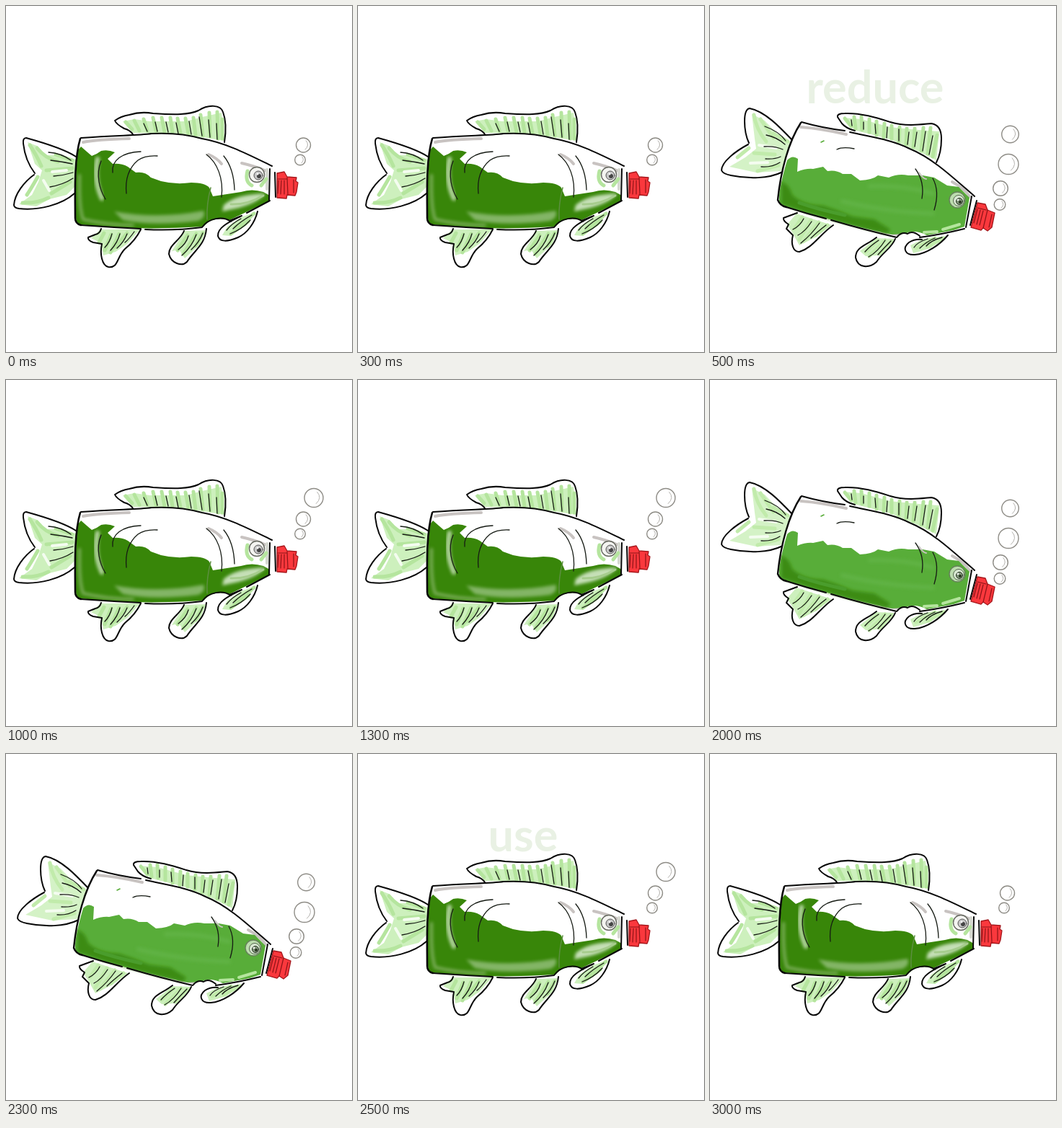
An HTML page that plays this animation: 480 by 480 pixels, repeating every 3500 ms.

```html
<!DOCTYPE html>
<html lang="en">
<head>
<meta charset="utf-8">
<title>Bottle fish</title>
<style>
html, body { margin: 0; width: 100%; height: 100%; overflow: hidden; background: #fff; }
svg { display: block; width: 100%; height: 100%; }
path, circle { fill: none; stroke-linecap: round; stroke-linejoin: round; }
.ink { stroke: #080808; stroke-width: 2; }
.thin { stroke: #161b14; stroke-width: 1.3; }
.tint { fill: #cdf0bd; }
.wash { stroke: #b5e59e; stroke-width: 5; }
.gap { stroke: #f4fcf0; stroke-width: 4; }
.grey { stroke: #c8c3c1; stroke-width: 4; }
.dark { fill: #388609; }
.leaf { fill: #58ad39; }
.glow { stroke: #a6cc8d; stroke-width: 6; }
.lens { fill: #9cc585; }
.red { fill: #fa383d; stroke: #a5161b; stroke-width: 1.3; }
.rib { stroke: #8d1418; stroke-width: 1.2; }
.soft { filter: url(#soft); }
.bubble { fill: #fff; stroke: #8e8c86; stroke-width: 1.4; }
.shine { stroke: #b4b2ae; stroke-width: 1; }
text { font: 700 63px Lato, sans-serif; fill: #e9f1e4; text-anchor: middle; }
</style>
</head>
<body>
<svg viewBox="0 0 480 480">
<defs><filter id="soft" x="-30%" y="-60%" width="160%" height="220%"><feGaussianBlur stdDeviation="2"/></filter></defs>
<text id="word" x="229" y="135"></text>

<g id="level">
  <!-- tail -->
  <path class="tint" d="M30 189L43 194L56 207L74 207L97 213L97 249L84 262L60 268L42 278L18 275L36 262L45 244L50 228L40 219Z"/>
  <path class="wash" d="M33 193Q42 206 49 222M43 197Q54 211 72 216M44 237Q35 253 29 262M23 273Q43 274 59 266M63 260L89 244M69 206L92 214M56 228L92 225"/>
  <path class="gap" d="M52 242L60 256M64 230L84 228"/>
  <path class="ink" d="M97 209C82 199 57 191 28 183Q23 183 24 191C26 209 33 223 40 232M39 234C25 244 12 261 11 276Q11 280 18 281C45 284 77 276 95 260"/>
  <path class="thin" d="M59 203Q76 204 90 214M62 214Q78 216 92 219M66 236Q80 235 93 231M61 251Q79 248 93 239"/>
  <!-- dorsal fin -->
  <path class="tint" d="M162 160L178 157L200 160L250 160L272 154L299 148L303 187L272 182L230 177L176 176Z"/>
  <path class="wash" d="M166 161l9 10M178 159l7 14M191 157l5 16M204 155l4 18M216 155l4 20M228 155l3 20M238 156l4 20M249 156l4 21M260 155l3 24M270 151l3 29M282 148l1 33M293 147l1 37M300 157l0 27"/>
  <path class="ink" d="M176 178Q172 172 164 170Q153 164 151 159Q159 153 171 151Q187 146 204 149C235 151 254 151 267 145C281 136 298 137 301 147C306 160 305 176 303 189"/>
  <path class="thin" d="M191 163l5 11M207 161l3 13M222 161l3 14M236 162l3 15M254 160l3 18M268 154l4 26M281 158l2 24M292 163l1 22"/>
  <!-- lower fins -->
  <path class="tint" d="M131 310L186 310L168 330L152 341L135 346L132 329L118 322ZM248 312L277 311L270 330L248 350L240 338L230 340ZM347 286L334 304L311 319L300 318L307 306L326 293Z"/>
  <path class="wash" d="M136 315l-7 13M146 317l-9 22M157 316l-12 26M168 315l-17 20M252 318l-14 21M264 316l-18 28M273 315l-10 18M344 288l-26 19M336 299l-24 17"/>
  <path class="ink" d="M132 309Q130 316 124 317L114 321Q113 325 121 328L133 330C130 344 133 360 142 362C156 364 153 349 165 337C175 329 182 320 187 310M247 312C242 325 226 331 226 344C229 357 244 362 251 355C261 339 276 332 278 309M349 285C345 301 335 315 322 321C308 327 296 328 294 319C293 307 311 299 325 292"/>
  <path class="thin" d="M147 316Q144 328 137 335M158 316Q155 328 145 339M168 316Q164 327 154 336M178 313Q171 323 165 328M253 319Q250 330 239 338M264 317Q258 334 244 346M273 315Q268 328 257 338M341 290Q325 299 315 309M339 297Q327 310 311 316M326 295Q313 302 306 311"/>
  <!-- bottle -->
  <path style="fill:#fff" d="M104 183C170 177 230 174 272 184C310 191 345 208 367 223L366 268L312 298Q291 290 272 307Q180 312 97 302Q94 230 104 183"/>
  <path class="grey" d="M107 189Q126 185 171 184M327 218Q345 222 361 229M281 206Q293 211 299 219"/>
  <path class="grey" d="M362 227L362 254" style="stroke:#d5d8d0"/>
  <path class="dark" d="M100 200L104 195L112 202L119 208Q127 205 132 201Q142 199 151 203L141 212L148 219Q160 218 169 223L180 231Q193 229 201 238L215 243Q235 248 257 245Q276 245 282 252L287 264L300 262L326 258Q341 253 357 258L366 263L366 270L333 286L310 297Q286 291 274 306Q181 312 103 303Q97 302 97 294Q95 240 100 200"/>
  <path class="soft" d="M102 235Q101 280 107 296Q140 304 176 304" style="stroke:#7aad59;stroke-width:4"/>
  <path class="soft" d="M127 212Q121 241 133 267" style="stroke:#b9d8a6;stroke-width:6"/>
  <path class="lens soft" d="M150 285Q210 296 274 284Q278 293 267 298Q204 306 162 297Z" opacity=".75"/>
  <path class="lens soft" d="M302 276Q319 261 360 260Q349 273 323 280L300 285Z" style="fill:#c5dfb6"/>
  <path class="glow" d="M312 275Q335 276 357 263" style="stroke-width:3"/>
  <path class="wash" d="M335 229Q331 244 341 249M354 249L361 240"/>
  <path d="M284 252Q278 275 279 296" style="stroke:#5d8f40;stroke-width:1.5"/>
  <path class="thin" d="M148 231C146 214 161 203 187 202M132 215C124 234 130 255 138 268M278 206C293 217 302 239 299 265M167 260Q164 230 183 214Q193 207 210 208M302 208Q316 225 317 255"/>
  <path class="ink" d="M104 183C154 179 181 180 202 177Q241 175 272 184C306 190 338 207 369 222M104 304Q147 307 187 309M193 310Q235 312 272 307C281 294 301 291 312 299M310 298L327 291M334 287L366 270"/>
  <path class="ink" d="M103 184C94 214 96 264 96 294Q96 302 104 304" style="stroke-width:2.6"/>
  <path class="ink" d="M366 226L365 270M373 231L374 265"/>
  <!-- eye -->
  <circle cx="348" cy="234" r="10.5" style="fill:#f4f4f1;stroke:#65685f;stroke-width:1.4"/>
  <circle cx="350" cy="235" r="6" style="fill:#c8c8c8;stroke:#555"/>
  <circle cx="351" cy="236" r="3" style="fill:#444"/>
  <circle cx="349" cy="233" r="1.5" style="fill:#fff"/>
  <!-- cap -->
  <path class="red" d="M376 232L386 230L390 237L403 238L402 243L405 245L403 258L401 263L390 262L389 267L376 266Z"/>
  <path class="rib" d="M378 242L377 260M382 242L381 261M386 242L386 261M390 238L391 261M377 240l12 0M399 241L399 259"/>
</g>

<g id="tilt">
  <!-- tail -->
  <path class="tint" d="M58 150L76 159L94 178L112 189L103 224L98 229L64 231L27 223L49 210L64 198L62 184Z" opacity=".85"/>
  <path class="wash" d="M61 151Q64 171 78 188M70 157L88 183M88 177L108 188M54 197L38 210M61 204L90 206M66 229L95 221" style="stroke:#c1ebab"/>
  <path class="gap" d="M56 218L80 217M68 193L92 197"/>
  <path class="ink" d="M115 187C97 168 76 146 55 142Q48 143 48 160Q48 177 54 190M53 192C36 201 16 216 16 228Q18 233 29 235C53 240 81 240 101 230"/>
  <path class="thin" d="M76 167Q96 174 105 187M78 179Q93 182 104 192M75 195Q90 194 101 199M77 212Q89 213 98 209M71 223Q86 224 97 217"/>
  <!-- dorsal fin -->
  <path class="tint" d="M185 155L210 157L250 168L290 172L318 174L314 214L290 202L250 185L200 172Z"/>
  <path class="wash" d="M187 156l9 11M200 154l2 16M210 154l1 18M221 157l0 18M231 160l0 19M242 163l-1 19M252 166l0 18M263 168l-1 20M273 170l-1 22M284 170l-2 26M296 169l-3 32M306 169l-4 36M315 179l-6 30"/>
  <path class="ink" d="M201 173Q189 170 183 163L177 154Q176 149 187 149C209 148 231 155 250 161C274 168 295 164 307 163Q321 165 321 184Q321 204 314 217"/>
  <path class="thin" d="M196 158l1 8M213 161l0 10M229 164l1 13M246 168l-1 15M262 171l0 16M276 175l-2 17M287 175l-3 20M299 174l-4 27M309 180l-5 26"/>
  <!-- lower fins -->
  <path class="tint" d="M120 288L169 304L148 320L124 332L115 316L107 303ZM231 322L256 323L248 334L232 346L216 347L208 340ZM327 319L306 336L282 343L278 332L296 323Z"/>
  <path class="wash" d="M128 293l-11 16M140 297l-16 27M151 300l-21 26M163 304l-17 14M232 326l-16 15M243 325l-22 22M252 326l-17 18M324 322l-22 12M312 322l-26 14" style="stroke:#c1ebab"/>
  <path class="ink" d="M121 287L102 294Q101 298 109 303L106 309L115 318C112 330 115 341 124 341C142 336 152 317 171 304M231 321C216 333 202 334 202 349C205 364 221 364 231 355C240 341 252 336 257 323M330 318C320 330 301 344 284 345C271 346 266 336 276 328Q284 323 294 324"/>
  <path class="thin" d="M130 295Q125 305 115 310M141 299Q132 313 122 318M152 301Q141 317 126 329M161 304Q148 314 140 322M234 325Q222 333 215 341M243 325Q233 341 220 348M251 326Q242 335 233 345M322 321Q307 325 300 333M312 322Q300 327 291 336M302 323Q287 328 283 335"/>
  <!-- bottle -->
  <path style="fill:#fff" d="M127 162C180 173 230 178 270 195C307 212 338 241 367 268L354 308L291 318Q273 309 258 321Q174 304 95 271Q101 203 127 162"/>
  <path class="grey" d="M126 168Q155 170 189 178M336 244Q353 253 360 264M353 289L349 304M239 313L261 317"/>
  <path class="leaf" d="M107 214Q114 206 122 212L121 230Q133 225 143 226L157 223L163 229Q175 227 184 233L196 233L208 242Q226 241 233 235L248 238Q261 232 275 235L295 235L311 238L329 249L345 251L360 266L353 306L338 311L301 318Q283 309 270 316L252 317Q178 301 98 276Q94 270 98 250Q101 234 107 214"/>
  <path class="dark soft" d="M99 244Q110 247 114 262Q128 276 157 277Q177 283 198 292L228 296L250 310L246 316Q177 301 99 275Z" opacity=".85"/>
  <path d="M124 273Q149 282 187 290" style="stroke:#4a9d2c;stroke-width:5"/>
  <path class="soft" d="M222 250Q266 248 309 260M184 271Q240 285 309 288" style="stroke:#61b344;stroke-width:6"/>
  <path class="wash" d="M323 310L346 303M297 314L315 313" style="stroke-width:4"/>
  <path d="M154 189l4-2" style="stroke:#58ad39;stroke-width:1.6"/>
  <path class="thin" d="M176 199Q184 195 200 198M285 226Q298 244 294 267M309 239Q319 257 311 283"/>
  <path class="grey" d="M290 231Q296 240 300 240" style="stroke-width:2"/>
  <path class="ink" d="M127 161Q155 169 187 173M194 175C225 182 254 186 277 198C309 211 337 238 367 264M106 279Q134 288 161 295M168 297C199 306 229 314 259 321M260 320Q266 313 274 316Q281 311 291 319M291 321Q321 317 353 309"/>
  <path class="ink" d="M126 162C109 188 98 229 94 269Q97 277 106 279" style="stroke-width:2.4"/>
  <path class="ink" d="M363 264L355 307M370 270L361 304"/>
  <!-- eye -->
  <circle cx="343" cy="269" r="11" style="fill:#bcdcae;stroke:#66815a;stroke-width:1.4"/>
  <circle cx="345" cy="270" r="7.5" style="fill:#d9e8d2;stroke:#55684d"/>
  <circle cx="346" cy="271" r="4.5" style="fill:#819679;stroke:#263323"/>
  <circle cx="347" cy="272" r="2" style="fill:#26331f"/>
  <circle cx="344" cy="269" r="1.3" style="fill:#fff"/>
  <!-- cap -->
  <path class="red" d="M371 273L382 275L385 283L395 287L394 292L391 307L385 312L379 308L376 311L362 307Z"/>
  <path class="rib" d="M371 282L366 301M375 283L370 303M379 284L374 304M385 283L379 308M371 280l12 3M391 289L387 307"/>
</g>
<g id="bubbles"></g>
</svg>
<script>
const $ = id => document.getElementById(id);
const STEP = 500;

// Bubble centre, radius; each pose has its own rising column
const columns = {
  level: [[408, 213.5, 7.3], [412.5, 193, 10], [427, 163.5, 13]],
  tilt: [[402, 275.5, 7.8], [403, 253, 10.3], [414, 219.5, 14], [416.5, 178, 11.8], [419, 143, 16], [436, 91, 21]]
};

// Pose, word, visible bubbles
const steps = [
  ['level', '', 2],
  ['tilt', 'reduce', 4],
  ['level', '', 3],
  ['tilt', 'your', 6],
  ['tilt', '', 4],
  ['level', 'use', 3],
  ['level', '', 2]
];

const bubble = ([x, y, r]) => {
  const k = r * 0.62;
  return `<circle class="bubble" cx="${x}" cy="${y}" r="${r}"/>` +
    `<path class="shine" d="M${x + k * 0.6} ${y - k}Q${x + r * 0.92} ${y} ${x + k * 0.4} ${y + k}"/>`;
};

let shown = -1;
function draw(now) {
  const i = Math.floor(now / STEP) % steps.length;
  if (i !== shown) {
    const [pose, word, count] = steps[i];
    for (const id of ['level', 'tilt']) $(id).style.display = id === pose ? '' : 'none';
    $('word').textContent = word;
    $('bubbles').innerHTML = columns[pose].slice(0, count).map(bubble).join('');
    shown = i;
  }
}

const start = performance.now();
function tick() {
  draw(performance.now() - start);
  requestAnimationFrame(tick);
}
tick();
</script>
</body>
</html>
```
